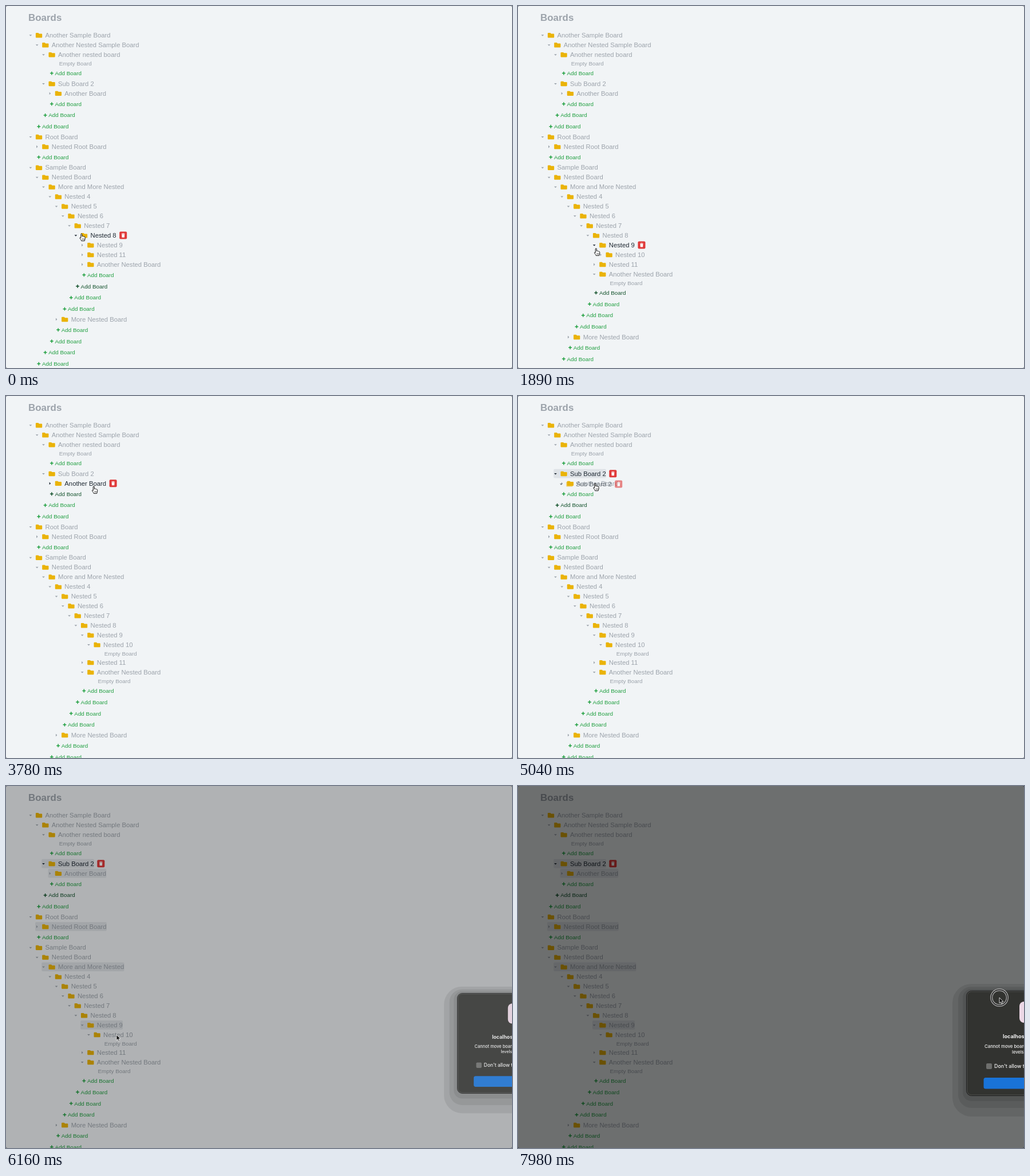
An HTML page for the animation above (8 s loop, 884 px wide and 633 px high).

```html
<!DOCTYPE html>
<html lang="en">
<head>
<meta charset="utf-8">
<title>Boards</title>
<style>
html, body { margin: 0; width: 100%; height: 100%; overflow: hidden; background: #8d9093; }
svg { display: block; width: 884px; height: 633px; font-family: 'Liberation Sans', Arial, sans-serif; }
.ui { font-family: Inter, Roboto, sans-serif; fill: #f2f2f2; font-weight: 500; }
</style>
</head>
<body>
<svg id="stage" viewBox="0 0 884 633"></svg>
<script>
const LOOP = 8000, STEP = 70, S = 0.7055;
const DRAG = 4900, DROP = 6020, RING = 7770;
const ROW = 24 * S, ADD = 28 * S, EMPTY = 20 * S, INDENT = 16 * S, FONT = 16 * S, SMALL = 14 * S;
const BG = '#f1f4f6', TEXT = '#9ca3ab', DARK = '#1f2933', GREEN = '#22a042', DEEP = '#14532d';
const AMBER = '#eab308', RED = '#e03a3a', MARK = '#dfe3e7';
const stage = document.getElementById('stage');

// indentation is depth; v open, > closed, e empty note, + add button
const outline = `
v Another Sample Board
 v Another Nested Sample Board
  v Another nested board
   e
   +
  v Sub Board 2
   > Another Board
   +
  +
 +
v Root Board
 > Nested Root Board
 +
v Sample Board
 v Nested Board
  v More and More Nested
   v Nested 4
    v Nested 5
     v Nested 6
      v Nested 7
       v Nested 8
        > Nested 9
         > Nested 10
          e
        > Nested 11
        > Another Nested Board
         e
        +
       +
      +
     +
    > More Nested Board
    +
   +
  +
 +`.split('\n').slice(1).map(line => {
  const [, indent, kind, label] = line.match(/^( *)(\S) ?(.*)$/);
  return { depth: indent.length, kind, label };
});
const opens = { 'Another Nested Board': 1050, 'Nested 9': 1820, 'Nested 10': 2800 };
const passed = ['Sub Board 2', 'Another Board', 'Nested Root Board', 'More and More Nested', 'Nested 9'];

// pointer tip: start, end, x, y of each move
const moves = [
  [0, 0, 132.5, 398.3], [70, 840, 133, 451], [1120, 1540, 137, 424], [2450, 2730, 144, 435],
  [2940, 3290, 149, 447], [3360, 3640, 154, 158], [4200, 4550, 125.5, 135],
  [4830, 4970, 129, 122], [4970, 5670, 193, 435], [6300, 6510, 694, 436],
  [6580, 6860, 849, 457], [6930, 7280, 878, 513], [7280, 7770, 841, 370]
];

const clamp = v => Math.min(1, Math.max(0, v));

function pointer(t) {
  const i = moves.findLastIndex(m => m[0] <= t);
  const [start, end, x, y] = moves[i];
  const [, , px, py] = moves[Math.max(0, i - 1)];
  const k = end > start ? clamp((t - start) / (end - start)) : 1;
  return [px + (x - px) * k, py + (y - py) * k];
}

const pen = document.createElement('canvas').getContext('2d');
function textWidth(label) {
  pen.font = `${FONT}px 'Liberation Sans', Arial, sans-serif`;
  return pen.measureText(label).width;
}

const text = (x, y, size, label, extra = '') =>
  `<text x="${x}" y="${y}" font-size="${size}" ${extra}>${label}</text>`;
const box = (x, y, w, h, r, fill, extra = '') =>
  `<rect x="${x}" y="${y}" width="${w}" height="${h}" rx="${r}" fill="${fill}" ${extra}/>`;
const path = (d, fill, extra = '') => `<path d="${d}" fill="${fill}" ${extra}/>`;
const place = (x, y, body, extra = '') => `<g transform="translate(${x} ${y})" ${extra}>${body}</g>`;

const FOLDER = 'M14.5 4H8.5L6.5 2H1.5A1.5 1.5 0 0 0 0 3.5V12.5A1.5 1.5 0 0 0 1.5 14H14.5' +
  'A1.5 1.5 0 0 0 16 12.5V5.5A1.5 1.5 0 0 0 14.5 4Z';
const TRASH = 'M-2.9-3.3H-1.1L-.8-3.8H.8L1.1-3.3H2.9V-2.4H-2.9ZM-2.5-1.9H2.5L2.2 3.6H-2.2Z';
const HAND = 'M-2.7 1.2V-5.2C-2.7-6.8-.6-6.8-.6-5.2V-1.5C-.2-2.3 1-2.2 1.3-1.4C1.9-2 2.9-1.7 3.1-.9' +
  'C3.9-1.3 4.7-.8 4.7 .1V2.6C4.7 4 3.8 4.8 3.7 6.2H-1.8C-1.9 4.8-3.2 3.8-4.4 1.6C-5 .5-3.7-.2-2.7 1.2Z';
const ARROW = 'M0 0V9.8L2.2 7.7 3.7 11.2 5.4 10.5 3.9 7.1H6.9Z';

// visible rows with their positions
function layout(t) {
  const rows = [];
  let top = 51 - ROW / 2, closed = Infinity;
  for (const item of outline) {
    if (item.depth > closed) continue;
    const { depth, kind, label } = item;
    const open = kind === 'v' || t >= opens[label];
    closed = kind === '>' && !open ? depth : Infinity;
    const h = kind === '+' ? ADD : kind === 'e' ? EMPTY : ROW;
    rows.push({ ...item, open, x: 42.9 + depth * INDENT, y: top + h / 2 });
    top += h;
  }
  return rows;
}

function hovered(t, rows) {
  const [px, py] = pointer(Math.min(t, 4760));
  return rows.findIndex(r => r.label && Math.abs(py - r.y) < ROW / 2 &&
    px > r.x - 6 && px < r.x + 40 + textWidth(r.label));
}

function boardRow({ x, y, label, open }, active, marked) {
  const w = textWidth(label), ink = active ? DARK : TEXT;
  const caret = open ? 'M-2.4-1H2.4L0 1.5Z' : 'M-1.1-2.4V2.4L1.4 0Z';
  return (marked ? box(x - 3.2, y - 7.8, w + 29, 15.6, 2, MARK) : '') +
    place(x, y + 0.3, path(caret, ink)) +
    place(x + 9, y, path(FOLDER, AMBER, `transform="scale(${S}) translate(0 -7.6)"`)) +
    text(x + 25.6, y + 4, FONT, label, `fill="${ink}"`) +
    (active ? place(x + 37.7 + w, y + 0.1, box(-6.5, -6.5, 13, 13, 2, RED) + path(TRASH, '#fff')) : '');
}

function addRow({ x, y }, active) {
  const ink = active ? DEEP : GREEN;
  return path(`M${x + 0.2} ${y + 0.3}h5.8m-2.9-2.9v5.8`, 'none', `stroke="${ink}" stroke-width="1.5"`) +
    text(x + 8.7, y + 3.8, SMALL, 'Add Board', `fill="${ink}"`);
}

function tree(t) {
  const rows = layout(t), over = hovered(t, rows);
  const add = over < 0 ? -1
    : rows.findIndex((r, i) => i > over && r.kind === '+' && r.depth === rows[over].depth);
  const swept = passed.slice(0, Math.max(0, Math.ceil((t - DRAG + 1) / 175)));
  let s = rows.map((r, i) =>
    r.kind === '+' ? addRow(r, i === add)
    : r.kind === 'e' ? text(r.x + 16, r.y + 3.8, SMALL, 'Empty Board', `fill="${TEXT}"`)
    : boardRow(r, i === over, swept.includes(r.label))).join('');
  if (t >= DRAG && t < DROP) {
    const [x, y] = pointer(t), [gx, gy] = pointer(DRAG - STEP);
    s += place(x - gx, y - gy, boardRow(rows[over], true, false), 'opacity=".6"');
  }
  return s;
}

function sheet(p) {
  const late = (1 - p) ** 2;
  const shadow = [24, 14, 6].map(d =>
    box(783 - d, 358 - d / 2, 223 + 2 * d, 184 + 2 * d, 9 + d, '#000', 'opacity=".09"')).join('');
  const body =
    box(783.5, 358.5, 223, 183, 9, '#323330', 'stroke="#151515"') +
    box(784.4, 359.4, 221, 181, 8, 'none', 'stroke="#646562" stroke-width=".7"') +
    box(876, 377, 37, 37, 8, '#ecd8e6') +
    text(847, 441.4, 9.1, 'localhost:3000 says', 'font-weight="700"') +
    text(815, 458.2, 7.8, 'Cannot move boards beyond allowed') +
    text(863, 468, 7.5, 'levels of nesting') +
    box(818, 485, 10, 10, 2, '#6e6f6d') +
    text(832, 493.4, 8.9, "Don't allow this page to ask again") +
    box(813.5, 510, 162, 19.5, 3.5, '#1973d8');
  return `<g class="ui" opacity="${1 - 0.64 * late}" transform="translate(894.5 450) ` +
    `scale(${1 - 0.18 * late}) translate(-894.5 -450)">${shadow}${body}</g>`;
}

function cursor(t) {
  const [x, y] = pointer(t);
  if (t <= DROP) {
    return place(x + 1, y + 6.2, path(HAND, '#fff', 'stroke="#111"') +
      path('M-.2 2V4.6M1.4 2V4.6M2.9 2V4.6', 'none', 'stroke="#111" stroke-width=".6"'));
  }
  const k = clamp(0.6 + (t - RING) / 350);
  const ring = t < RING ? '' : `<g transform="scale(${k})" fill="none">` +
    '<circle r="13.8" stroke="#c4c4c4" stroke-width="4"/><circle r="13.8" stroke="#333" stroke-width="2"/></g>';
  return place(x, y, ring + path(ARROW, '#111', 'stroke="#fff" stroke-width=".8"'));
}

function draw(t) {
  const p = clamp((t - DROP) / 280);
  stage.innerHTML = box(0, 0, 884, 633, 3, BG) +
    text(39, 26.3, 24 * S, 'Boards', `font-weight="700" fill="${TEXT}"`) + tree(t) +
    (p ? box(0, 0, 884, 633, 0, '#000', `opacity="${0.545 * p}"`) + sheet(p) : '') + cursor(t);
}

let last = -1;
function tick(now) {
  const t = Math.floor((now % LOOP) / STEP) * STEP;
  if (t !== last) draw(last = t);
  requestAnimationFrame(tick);
}
draw(0);
requestAnimationFrame(tick);
</script>
</body>
</html>
```
